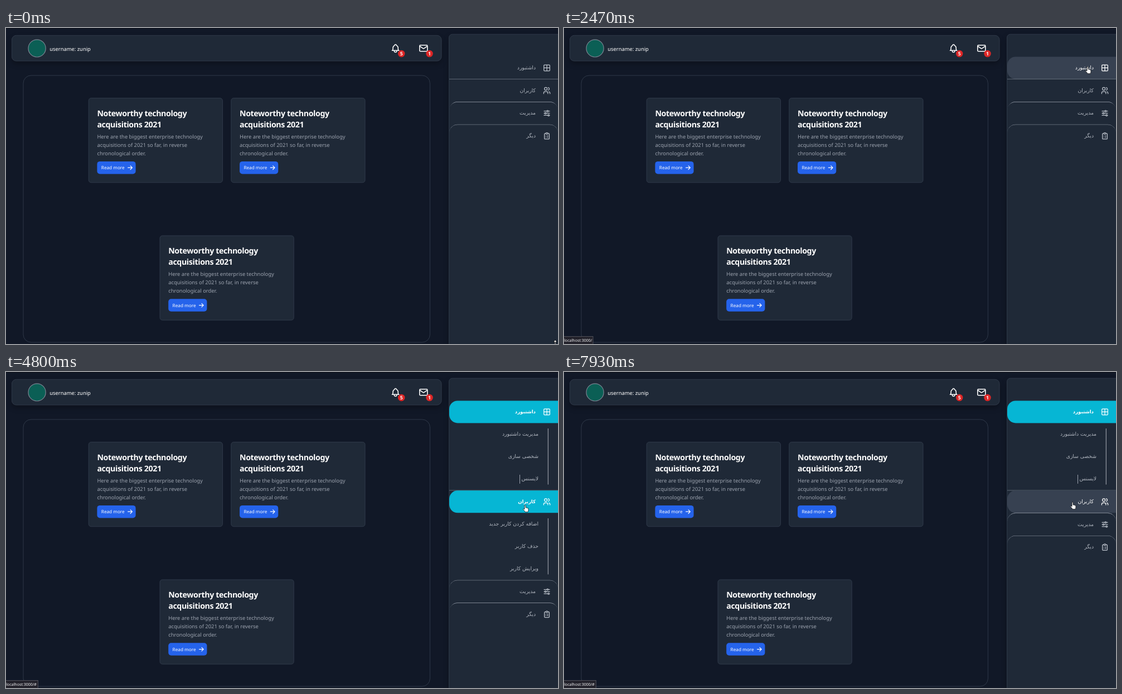
Write an HTML page that moves like this. It is 990 px wide and 566 px high and loops after 8 s.

```html
<!DOCTYPE html>
<html lang="en">
<head>
<meta charset="utf-8">
<title>Dashboard</title>
<style>
  html, body { margin: 0; width: 100%; height: 100%; overflow: hidden; background: #111827; }
  svg { display: block; width: 990px; height: 566px; }
  text { font: 9.4px "Noto Sans", "Open Sans", sans-serif; fill: #9ca3af; text-rendering: geometricPrecision; white-space: pre; }
  .white { fill: #fff; }
  .title { font-size: 14.2px; font-weight: 700; letter-spacing: -.375px; fill: #fff; }
  .more { font-size: 8.2px; font-weight: 500; fill: #fff; }
  .badge { font-size: 8.6px; font-weight: 700; fill: #fff; text-anchor: middle; }
  .status { font-size: 7px; fill: #f3f4f6; }
  .panel { fill: #1f2937; stroke: #374151; stroke-width: .8; }
  .shadow { filter: drop-shadow(0 5px 5px #0004); }
  .icon { fill: none; stroke: #fff; stroke-width: 2; stroke-linecap: round; stroke-linejoin: round; }
  .rule { fill: #9ca3af; }
  .fa { font-family: "DejaVu Sans", sans-serif; font-size: 9.2px; direction: rtl; fill: #b0b6bf; }
  .menu .icon { stroke: #bcc2cb; }
  .bg { fill: none; }
  .hover > .bg { fill: #374151; }
  .hover > .fa, .on > .fa { fill: #fff; }
  .hover > .icon, .on > .icon { stroke: #fff; }
  .on > .bg { fill: #06b6d4; }
  .on > .fa { font-weight: 700; font-size: 8.5px; }
  .cursor path { fill: #fff; stroke: #000; stroke-width: .7; stroke-linejoin: round; }
</style>
</head>
<body>
<svg id="stage" viewBox="0 0 990 566" xmlns="http://www.w3.org/2000/svg"></svg>
<script>
const LOOP = 8000, STEP = 200 / 3;
// Each menu group: a hairline, a header, then its sub items
const SIDE = 795, TOP = 50.77, LINE = .63, HEAD = 40, PITCH = LINE + HEAD, SUB = 40.1, OPEN = 3 * SUB;

const icons = {
  bell: 'M10 5a2 2 0 0 1 4 0a7 7 0 0 1 4 6v3a4 4 0 0 0 2 3H4a4 4 0 0 0 2-3v-3a7 7 0 0 1 4-6M9 17v1a3 3 0 0 0 6 0v-1',
  mail: 'M5 5h14a2 2 0 0 1 2 2v10a2 2 0 0 1-2 2H5a2 2 0 0 1-2-2V7a2 2 0 0 1 2-2M3 7l9 6l9-6',
  grid: 'M5.5 3.5h13a2 2 0 0 1 2 2v13a2 2 0 0 1-2 2h-13a2 2 0 0 1-2-2v-13a2 2 0 0 1 2-2M3.5 12h17M12 3.5v17',
  users: 'M5 7a4 4 0 1 0 8 0a4 4 0 1 0-8 0M3 21v-2a4 4 0 0 1 4-4h4a4 4 0 0 1 4 4v2M16 3.13a4 4 0 0 1 0 7.75M21 21v-2a4 4 0 0 0-3-3.85',
  sliders: 'M12 6a2 2 0 1 0 4 0a2 2 0 1 0-4 0M4 6h8M16 6h4M6 12a2 2 0 1 0 4 0a2 2 0 1 0-4 0M4 12h2M10 12h10M15 18a2 2 0 1 0 4 0a2 2 0 1 0-4 0M4 18h11M19 18h1',
  list: 'M9 5H7a2 2 0 0 0-2 2v12a2 2 0 0 0 2 2h10a2 2 0 0 0 2-2V7a2 2 0 0 0-2-2h-2M11 3h2a2 2 0 0 1 0 4h-2a2 2 0 0 1 0-4M9 12h.01M13 12h2M9 16h.01M13 16h2'
};

const menu = [
  { name: 'داشتبورد', icon: 'grid', subs: ['مدیریت داشتبورد', 'شخصی سازی', 'لایسنس'] },
  { name: 'کاربران', icon: 'users', subs: ['اضافه کردن کاربر جدید', 'حذف کاربر', 'ویرایش کاربر'] },
  { name: 'مدیریت', icon: 'sliders', subs: [] },
  { name: 'دیگر', icon: 'list', subs: [] }
];

const text = (x, y, s, cls = '') => `<text x="${x}" y="${y}" class="${cls}">${s}</text>`;
const box = (x, y, w, h, r, attrs) => `<rect x="${x}" y="${y}" width="${w}" height="${h}" rx="${r}" ${attrs}/>`;
const icon = (name, cx, cy, k) =>
  `<path class="icon" transform="translate(${cx} ${cy}) scale(${k}) translate(-12 -12)" d="${icons[name]}"/>`;
const badge = (x, n) => `<circle cx="${x}" cy="46" r="6.2" fill="#dc2626"/>` + text(x, 49.2, n, 'badge');

const card = (x, y) => `<g transform="translate(${x} ${y})">
  ${box(0, 0, 240.2, 151.2, 4.5, 'class="panel"')}
  ${text(15.2, 32, 'Noteworthy technology', 'title')}
  ${text(15.2, 52, 'acquisitions 2021', 'title')}
  ${text(15.2, 72.1, 'Here are the biggest enterprise technology')}
  ${text(15.2, 87.1, 'acquisitions of 2021 so far, in reverse')}
  ${text(15.2, 102.1, 'chronological order.')}
  ${box(15.2, 113.3, 69.2, 22.5, 5, 'fill="#2563eb"')}
  ${text(22.6, 127.8, 'Read more', 'more')}
  <path d="M70.5 124.6h7.6m-3.2-3.3l3.3 3.3-3.3 3.3" class="icon" style="stroke-width:1.2"/></g>`;

const subItem = (s, i) => `<g class="sub-item" transform="translate(0 ${PITCH + i * SUB})">
  ${box(0, .3, 172.5, 39.6, 6, 'class="bg"')}${text(160, 22.6, s, 'fa')}</g>`;

// The rounded hairline thins out towards its ends
const rounded = `M0 15A15 15 0 0 1 15 0H180A15 15 0 0 1 195 15A15 ${15 - LINE} 0 0 0 180 ${LINE}H15A15 ${15 - LINE} 0 0 0 0 15z`;
const border = i => i == 0 ? '' : i == 1 ? `M0 0H195V${LINE}H0z` : rounded;

const group = ({ name, icon: ic, subs }, i) => `<g class="group">
  <path class="rule" d="${border(i)}"/>
  <g class="head"><path class="bg" d="M195 ${LINE}v${HEAD}H15a15 15 0 0 1-15-15v-10a15 15 0 0 1 15-15z"/>
    ${text(155, 23.3, name, 'fa')}${icon(ic, 175, 20.7, .625)}</g>
  <g class="subs">${subs.map(subItem).join('')}
    ${subs.length ? box(176.8, 50.4, .8, 100.4, 0, 'fill="#d1d5db"') : ''}</g></g>`;

const stage = document.getElementById('stage');
stage.innerHTML = `
  ${box(0, 0, 990, 566, 0, 'fill="#111827"')}
  ${box(0, 0, 990, 1, 0, 'fill="#0a0d16"')}
  ${box(10.4, 13.3, 770.6, 45.8, 8, 'class="panel shadow"')}
  <circle cx="55.6" cy="36.4" r="15.6" fill="#0b5f55" stroke="#7b8391" stroke-width="1.2"/>
  ${text(78.2, 40.6, 'username: zunip', 'white')}
  ${icon('bell', 698.6, 36.5, .77)}${badge(709.2, 5)}
  ${icon('mail', 748.8, 36.3, .78)}${badge(759.5, 1)}
  ${box(31, 85, 729.4, 478, 14, 'fill="none" stroke="#374151" stroke-width=".8"')}
  ${card(148.2, 125.6)}${card(403.8, 125.6)}${card(276, 372)}
  ${box(794.5, 11.2, 220, 580, 6, 'class="panel shadow"')}
  <g class="menu">${menu.map(group).join('')}</g>
  <rect id="caret" x="921" y="184" width="1" height="16" fill="#9ca3af"/>
  <g id="status">
    <rect x="-1" y="552.5" width="58" height="15" fill="#23222b" stroke="#56565e" stroke-width=".9"/>
    ${text(.2, 562, '', 'status')}</g>
  <g class="cursor">
    <path d="M0 0V10.2L2.4 8l1.7 3.8 1.6-.7L4 7.4H7.2z"/>
    <path d="M0 1.1a1 1 0 0 1 2 0V5q1.2-.6 1.7.4 1.3-.5 1.7.5 1.5-.2 1.5 1.2V9.4q0 1.6-.9 3.3H1.2Q0 10.6-2.3 8.4-2.8 7 -1.4 7L0 8z"/>
    <path d="M0 0l3 3.6H.8V12H-.8V3.6H-3z"/></g>`;

const all = (sel, root = stage) => [...root.querySelectorAll(sel)];
const groups = all('.group').map(el => ({
  el, head: el.querySelector('.head'), subs: el.querySelector('.subs'), items: all('.sub-item', el)
}));
const caret = document.getElementById('caret');
const status = document.getElementById('status');
const cursor = stage.querySelector('.cursor');

// Pointer path: time, x, y
const path = [
  [0, 985, 559], [267, 976, 420], [533, 955, 215], [867, 920, 72], [933, 786, 58],
  [1267, 20, 42], [1400, 269, 38], [1667, 720, 42], [1733, 787, 48], [1800, 880, 60],
  [2333, 938, 69], [3400, 938, 69], [3467, 938, 82], [3600, 938, 119], [4067, 930, 238],
  [4933, 930, 238], [5267, 927, 285], [5800, 916, 396], [5867, 916, 396], [5933, 914, 424],
  [6533, 914, 424], [6600, 912, 396], [6733, 912, 396], [6800, 905, 365], [6867, 898, 338],
  [6933, 893, 293], [7000, 898, 268], [7133, 904, 236], [7200, 904, 236], [7267, 910, 238],
  [7400, 914, 239], [7867, 914, 239], [7933, 911, 233], [LOOP, 911, 233]
];

function pointer(t) {
  const i = Math.max(1, path.findIndex(p => p[0] >= t));
  const [t0, x0, y0] = path[i - 1], [t1, x1, y1] = path[i];
  const k = (t - t0) / (t1 - t0);
  return [x0 + (x1 - x0) * k, y0 + (y1 - y0) * k];
}

const within = (t, spans) => spans.some(([a, b]) => t >= a && t < b);
const blink = [[2600, 3000], [3530, 4060], [4600, 5200], [5730, 6260], [6800, 7330], [7600, LOOP]];

function draw(now) {
  const t = Math.floor((now % LOOP + 4) / STEP) * STEP + .5;
  const open = [t >= 2600, t >= 4800 && t < 7730, false, false];
  const [x, y] = pointer(Math.min(t, LOOP));
  const rushing = within(t, [[6800, 7000]]);
  const [hx, hy] = rushing ? pointer(t - STEP) : [x, y];

  let top = TOP, over = false;
  groups.forEach((g, i) => {
    const dy = hy - top, inside = hx >= SIDE;
    const hit = inside && dy >= 0 && dy < PITCH;
    const sub = inside && open[i] && dy >= PITCH ? Math.floor((dy - PITCH) / SUB) : -1;
    g.el.setAttribute('transform', `translate(${SIDE} ${top})`);
    g.head.setAttribute('class', 'head' + (open[i] ? ' on' : hit ? ' hover' : ''));
    g.subs.style.display = open[i] ? '' : 'none';
    g.items.forEach((el, n) => el.setAttribute('class', 'sub-item' + (n == sub ? ' hover' : '')));
    over = over || hit || (sub >= 0 && sub < g.items.length);
    top += PITCH + (open[i] ? OPEN : 0);
  });

  caret.style.display = within(t, blink) ? '' : 'none';
  const deep = t >= 3533;
  status.style.display = t >= 1866 ? '' : 'none';
  status.children[0].setAttribute('width', deep ? 58.3 : 53);
  status.children[1].textContent = 'localhost:3000/' + (deep ? '#' : '');

  const shape = t < 60 ? 2 : over && !rushing ? 1 : 0;
  [...cursor.children].forEach((el, i) => el.style.display = i == shape ? '' : 'none');
  cursor.setAttribute('transform', `translate(${x} ${y})`);
}

const start = performance.now();
function tick() {
  draw(performance.now() - start);
  requestAnimationFrame(tick);
}
tick();
</script>
</body>
</html>
```
